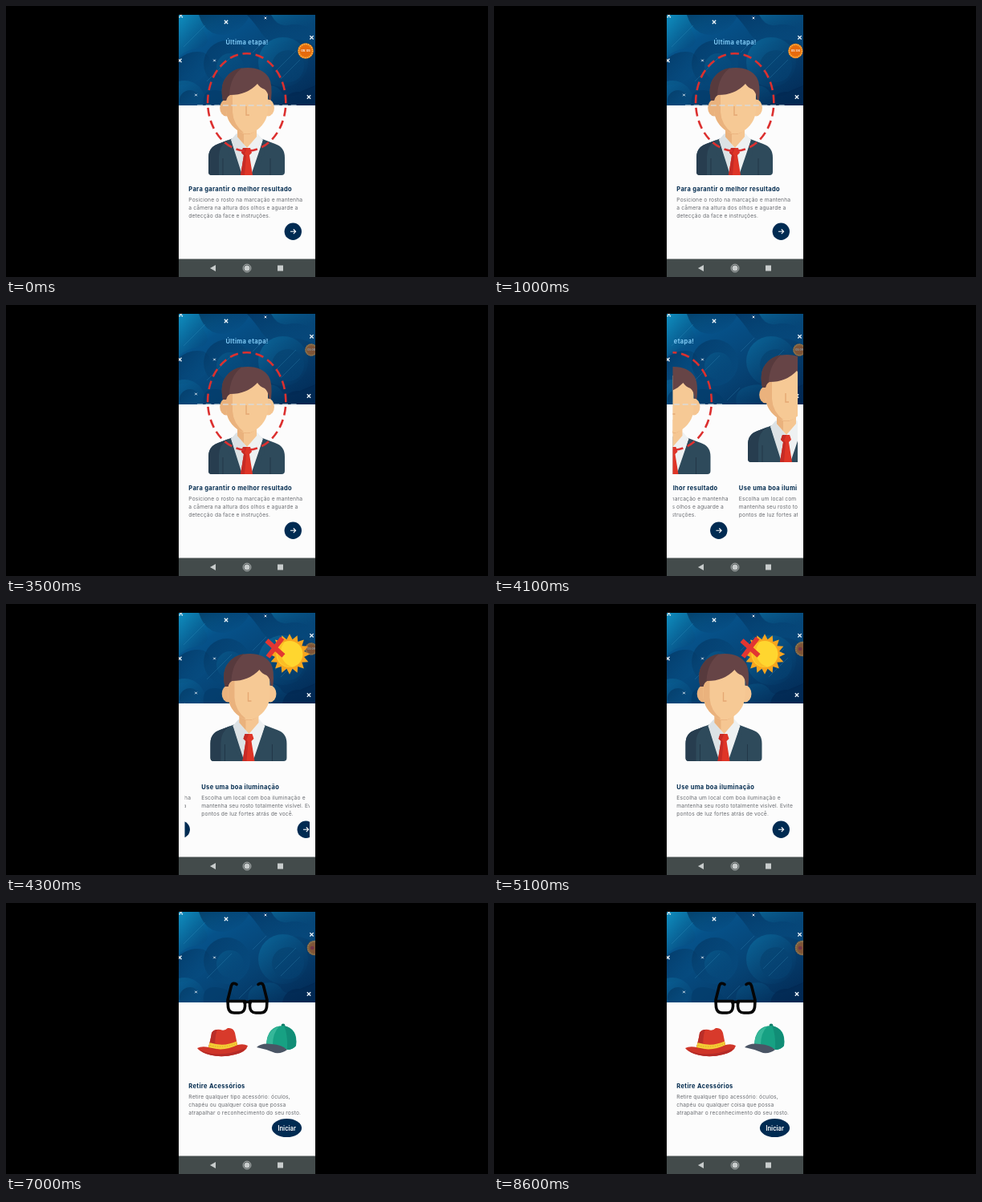
Recreate the animation shown at these times as an HTML page. Size 600x338 px, loop 8.7 s.

```html
<!DOCTYPE html>
<html lang="pt-BR">
<head>
<meta charset="utf-8">
<title>Última etapa</title>
<style>
html, body { margin: 0; width: 100%; height: 100%; overflow: hidden; background: #000; }
svg { display: block; width: 100%; height: 100%; }
text { font-family: Inter, "Open Sans", sans-serif; }
.title { font-weight: 700; font-size: 7.5px; letter-spacing: .35px; fill: #002a4e; }
.body { font-size: 6.7px; letter-spacing: .14px; fill: #686b70; }
.start { font: 500 8.2px Roboto, sans-serif; fill: #fff; text-anchor: middle; }
</style>
</head>
<body>
<svg viewBox="0 0 600 338" xmlns="http://www.w3.org/2000/svg">
<defs>
  <linearGradient id="sea" x1="0" y1="0" x2="1" y2="1">
    <stop offset="0" stop-color="#0880b2"/><stop offset=".25" stop-color="#06528a"/>
    <stop offset=".6" stop-color="#064273"/><stop offset="1" stop-color="#022852"/>
  </linearGradient>
  <linearGradient id="glow" x1="0" y1="0" x2="1" y2="1">
    <stop offset="0" stop-color="#1293c4" stop-opacity=".8"/><stop offset="1" stop-color="#053c6d" stop-opacity=".15"/>
  </linearGradient>
  <linearGradient id="deep" x1="0" y1="0" x2="1" y2="1">
    <stop offset="0" stop-color="#02264c" stop-opacity=".9"/><stop offset="1" stop-color="#085a92" stop-opacity=".5"/>
  </linearGradient>
  <clipPath id="hero"><rect x="215" y="11" width="170" height="113"/></clipPath>
  <clipPath id="view"><rect x="222.5" y="11" width="155.5" height="305"/></clipPath>
  <clipPath id="screen"><rect x="215" y="11" width="170" height="327"/></clipPath>

  <g id="man">
    <path d="M252 211V189Q252 176 264 172L285 164H314L335 172Q347 176 347 189V207Q347 211 343 211H256Q252 211 252 207Z" fill="#2e4a5b"/>
    <path d="M252 207V189Q252 176 264 172L277 167Q265 174 265 188V211H256Q252 211 252 207Z" fill="#273d4f"/>
    <path d="M270 190V211" stroke="#223748" stroke-width="1"/>
    <path d="M329 190V211" stroke="#223748" stroke-width="1"/>
    <path d="M287 159H313L320 167L307 211H293L280 167Z" fill="#eef1f2"/>
    <path d="M287 159L300 178L296 183L293 211L280 167Z" fill="#dce2e5"/>
    <path d="M280 167L277 186L283 189L280 193L292 211H294Z" fill="#2e4a5b"/>
    <path d="M320 167L322 186L316 189L319 193L308 211H305Z" fill="#2e4a5b"/>
    <path d="M295 177H304L306 183L303 186L307 211H292L296 186L293 183Z" fill="#df3527"/>
    <path d="M295 177H300L297 184L299 187L297 211H292L296 186L293 183Z" fill="#c62b25"/>
    <path d="M288 143H312V163L300 177L288 163Z" fill="#f5c692"/>
    <path d="M288 143H296V172L288 163Z" fill="#eab27d"/>
    <path d="M288 151Q300 163 312 151V154Q300 166 288 154Z" fill="#e4a774"/>
    <ellipse cx="273.8" cy="127" rx="7.6" ry="10.4" fill="#eab27d"/>
    <ellipse cx="326.4" cy="127" rx="7.6" ry="10.4" fill="#f5c692"/>
    <path d="M274 103Q276 88 300 88Q325 88 326 104V130Q325 147 309 157Q300 162 291 157Q275 147 274 130Z" fill="#f6c995"/>
    <path d="M274 103Q276 88 291 88Q282 96 282 110V132Q283 148 296 158Q293 158 291 157Q275 147 274 130Z" fill="#eab27d"/>
    <path d="M299 125V136H303" fill="none" stroke="#e5a873" stroke-width="1.4"/>
    <path d="M270 118Q266 99 274 89Q283 77 301 77Q319 77 327 89Q332 97 330 117H327Q327 108 322 104Q316 102 313 97Q300 111 279 111Q275 113 274 118Z" fill="#664446"/>
    <path d="M270 118Q266 99 274 89Q281 79 294 77Q279 88 278 111Q275 113 274 118Z" fill="#573a3d"/>
  </g>
  <g id="next">
    <circle cx="357.3" cy="281.3" r="10.7" fill="#002b52"/>
    <path d="M354 281.3H360.5M357.8 278.5L360.6 281.3L357.8 284.1" fill="none" stroke="#fff" stroke-width="1.1"/>
  </g>
</defs>

<rect width="600" height="338"/>
<g clip-path="url(#screen)">
  <rect x="215" y="11" width="170" height="327" fill="#fcfcfc"/>
  <g clip-path="url(#hero)">
    <rect x="215" y="11" width="170" height="113" fill="url(#sea)"/>
    <path d="M215 11H250Q241 25 249 36Q255 50 239 53Q224 54 215 64Z" fill="url(#glow)"/>
    <path d="M240 11H304Q294 32 272 36Q248 37 240 11Z" fill="url(#deep)" opacity=".7"/>
    <path d="M215 66Q230 54 246 58Q259 64 250 83Q240 98 215 99Z" fill="url(#deep)" opacity=".6"/>
    <path d="M300 11H385V50Q364 38 350 43Q329 50 318 34Q312 24 300 11Z" fill="url(#deep)" opacity=".6"/>
    <path d="M330 11H385V31Q367 20 350 24Q338 26 330 11Z" fill="url(#glow)" opacity=".5"/>
    <circle cx="275" cy="72" r="29" fill="url(#deep)" opacity=".55"/>
    <circle cx="279" cy="76" r="17" fill="url(#glow)" opacity=".3"/>
    <circle cx="345" cy="70" r="31" fill="url(#glow)" opacity=".5"/>
    <circle cx="351" cy="75" r="20" fill="url(#deep)" opacity=".35"/>
    <path d="M302 124Q298 106 317 101Q337 95 344 109Q353 119 385 100V124Z" fill="url(#glow)" opacity=".25"/>
    <path d="M344 124Q348 106 366 107L385 99V124Z" fill="#022750" opacity=".65"/>
    <circle cx="222" cy="119" r="26" fill="url(#glow)" opacity=".5"/>
    <circle cx="229" cy="118" r="13" fill="url(#deep)" opacity=".6"/>
    <path d="M246 124Q243 101 267 106Q284 109 288 124Z" fill="#043c6c" opacity=".7"/>
    <g stroke="#49a9d5" stroke-width=".7" opacity=".3">
      <path d="M250 94L281 63M221 51L248 24M307 58L324 41M335 82L361 56M342 91L366 67M290 119L306 103"/>
    </g>
    <g id="marks" stroke="#f2f8fc" fill="none"></g>
  </g>

  <g clip-path="url(#view)">
    <g class="page">
      <text x="273.5" y="47.8" class="title" style="fill:#80caf5">Última etapa!</text>
      <use href="#man"/>
      <path d="M238 124H362" stroke="#d5dde3" stroke-width="1.4" stroke-dasharray="7 3.6" opacity=".85"/>
      <ellipse cx="299.7" cy="120" rx="48.6" ry="60.8" fill="none" stroke="#dc302f" stroke-width="2.6" pathLength="84" stroke-dasharray="2.6 1.4" stroke-dashoffset="-1.7"/>
      <use href="#next"/>
    </g>
    <g class="page">
      <use href="#man" x="2.5" y="-15" transform="translate(-16)"/>
      <path id="rays" fill="#f8a51e"/>
      <circle cx="337" cy="62.5" r="16.5" fill="#ffd62f"/>
      <path d="M331 47.2A16.5 16.5 0 0 0 341 78.4A19 19 0 0 1 331 47.2Z" fill="#fbbd25"/>
      <path d="M308.5 45.5L329.5 64.5M328 42.5L310 66" stroke="#e23632" stroke-width="6"/>
      <use href="#next"/>
    </g>
    <g class="page">
      <g fill="none" stroke="#050505" stroke-width="3.6" stroke-linecap="round" stroke-linejoin="round">
        <path d="M276 122.5H297.5V129Q297 137 290 137H284Q277.5 137 276.5 130Z"/>
        <path d="M325 122.5H303.5V129Q304 137 311 137H317Q323.5 137 324.5 130Z"/>
        <path d="M297 124.5Q300.5 122 304 124.5M276 121L280.5 103Q282 98.5 287 101.5M325 121L320.5 103Q319 98.5 314 101.5"/>
      </g>
      <path d="M238 181Q243 178 253 180Q270 184 288 177Q296 175 301 178Q299 186 285 189Q266 194 249 188Q241 185 238 181Z" fill="#cf3529"/>
      <path d="M252 180Q255 169 256 162Q259 157 267 158Q272 160 276 156Q283 155 285 162L288 177Q271 186 252 180Z" fill="#d83a2b"/>
      <path d="M252 180Q255 169 256 162Q258 158 263 158Q259 168 261 183Q256 182 252 180Z" fill="#b92e28"/>
      <path d="M253.5 174Q271 180 287 172.5L288 177Q271 186 252 180Z" fill="#f4cd35"/>
      <path d="M254 177.5Q271 182 287 175" fill="none" stroke="#d99f25" stroke-width="1" stroke-dasharray="1.5 1.5"/>
      <path d="M241 183Q265 195 298 181Q295 187 285 189Q266 194 249 188Q244 186 241 183Z" fill="#b52b27"/>
      <circle cx="345" cy="153" r="2.4" fill="#0d7d68"/>
      <path d="M324 177Q325 153 345 153Q364 156 361 178Q357 183 350 183Q339 176 324 177Z" fill="#17a183"/>
      <path d="M324 177Q325 158 340 154Q332 162 332 177Z" fill="#36b799"/>
      <path d="M346 153Q363 157 361 178Q357 183 350 183Q351 164 346 153Z" fill="#118d76"/>
      <path d="M312 180Q318 174 331 176Q344 177 350 183Q344 188 335 187Q323 182 312 180Z" fill="#4a5565"/>
      <ellipse cx="349.5" cy="280.6" rx="18.6" ry="11.5" fill="#002b52"/>
      <text x="349.5" y="283.5" class="start">Iniciar</text>
    </g>
  </g>

  <g id="badge">
    <circle r="9.8" fill="#ec7d12"/>
    <circle r="8.6" fill="none" stroke="#ffc166" stroke-width="1.3" stroke-dasharray="1.2 1.5"/>
    <circle r="7" fill="#e66a0d"/>
    <text id="clock" y="1.4" text-anchor="middle" style="font-size:4.1px;font-weight:600" fill="#fff"></text>
    <circle id="dot" cx="-3" r="2.4" fill="#d2302a"/>
  </g>

  <rect x="215" y="315.5" width="170" height="23" fill="#434b4b"/>
  <g fill="#c8cccc">
    <path d="M254 327L261 323V331Z"/>
    <circle cx="300" cy="327" r="3.5"/>
    <circle cx="300" cy="327" r="4.9" fill="none" stroke="#c8cccc" stroke-width=".8"/>
    <rect x="338" y="323.5" width="7" height="7"/>
  </g>
</g>
</svg>
<script>
const LOOP = 8700, STEP = 100, PAGE = 155;
const $ = id => document.getElementById(id);
const pages = [...document.querySelectorAll('.page')];

const copy = [
  ['Para garantir o melhor resultado', 'Posicione o rosto na marcação e mantenha',
    'a câmera na altura dos olhos e aguarde a', 'detecção da face e instruções.'],
  ['Use uma boa iluminação', 'Escolha um local com boa iluminação e',
    'mantenha seu rosto totalmente visível. Evite', 'pontos de luz fortes atrás de você.'],
  ['Retire Acessórios', 'Retire qualquer tipo acessório: óculos,',
    'chapéu ou qualquer coisa que possa', 'atrapalhar o reconhecimento do seu rosto.']
];

function make(parent, tag, attrs, text = '') {
  const el = document.createElementNS('http://www.w3.org/2000/svg', tag);
  for (const key in attrs) el.setAttribute(key, attrs[key]);
  el.textContent = text;
  parent.prepend(el);
}

copy.forEach((lines, p) => lines.forEach((line, i) =>
  make(pages[p], 'text', {
    x: 227.3, y: i ? 234.4 + i * 10 : 231, class: i ? 'body' : 'title'
  }, line)));

// x, y, half size
[[274, 20, 2.2], [323, 15, 1.3], [380.5, 39.3, 2.2], [259.5, 68, 1.3],
 [216.3, 68, 2.2], [236.5, 111, 1.3], [377, 113.5, 2.2], [217.7, 12, 2.2]]
  .forEach(([x, y, r]) => make($('marks'), 'path', {
    d: `M${x - r} ${y - r}l${2 * r} ${2 * r}M${x + r} ${y - r}l${-2 * r} ${2 * r}`,
    'stroke-width': r > 2 ? 1.3 : 0.9
  }));

const spikes = 16;
$('rays').setAttribute('d', 'M' + Array.from({ length: spikes * 2 }, (_, i) => {
  const a = i * Math.PI / spikes, r = i % 2 ? 18.5 : 25.3;
  return `${(337 + r * Math.cos(a)).toFixed(2)} ${(62.5 + r * Math.sin(a)).toFixed(2)}`;
}).join('L') + 'Z');

// time, value
const slide = [[3800, 0], [3900, .04], [4000, .2], [4100, .5], [4200, .76], [4300, .897],
  [4400, .95], [4500, .978], [4600, .99], [4800, 1],
  [5400, 1], [5500, 1.04], [5600, 1.17], [5700, 1.4], [5800, 1.64], [5900, 1.805],
  [6000, 1.9], [6100, 1.955], [6200, 1.985], [6300, 2]];
const badgeX = [[900, 373], [1200, 380], [4700, 380], [4900, 384]];
const badgeSize = [[900, 1], [1200, .8], [4700, .8], [4900, .95]];
const badgeFade = [[1600, 1], [2200, .62], [2900, .62], [3200, .54]];

function at(steps, t) {
  const i = steps.findIndex(s => s[0] > t);
  if (i < 0) return steps[steps.length - 1][1];
  if (!i) return steps[0][1];
  const [t0, a] = steps[i - 1], [t1, b] = steps[i];
  return a + (b - a) * (t - t0) / (t1 - t0);
}

function draw(now) {
  const t = Math.floor(now % LOOP / STEP) * STEP;
  const pos = at(slide, t);
  pages.forEach((page, i) => page.setAttribute('transform', `translate(${(i - pos) * PAGE})`));
  $('badge').setAttribute('transform', `translate(${at(badgeX, t)} 56) scale(${at(badgeSize, t)})`);
  $('badge').setAttribute('opacity', at(badgeFade, t));
  $('clock').textContent = t < 4800 ? '05:' + String(5 + Math.floor(t / 1000)).padStart(2, '0') : '';
  $('dot').setAttribute('opacity', t < 4800 ? 0 : 1);
}

const start = performance.now();
function tick() {
  draw(performance.now() - start);
  requestAnimationFrame(tick);
}
tick();
</script>
</body>
</html>
```
